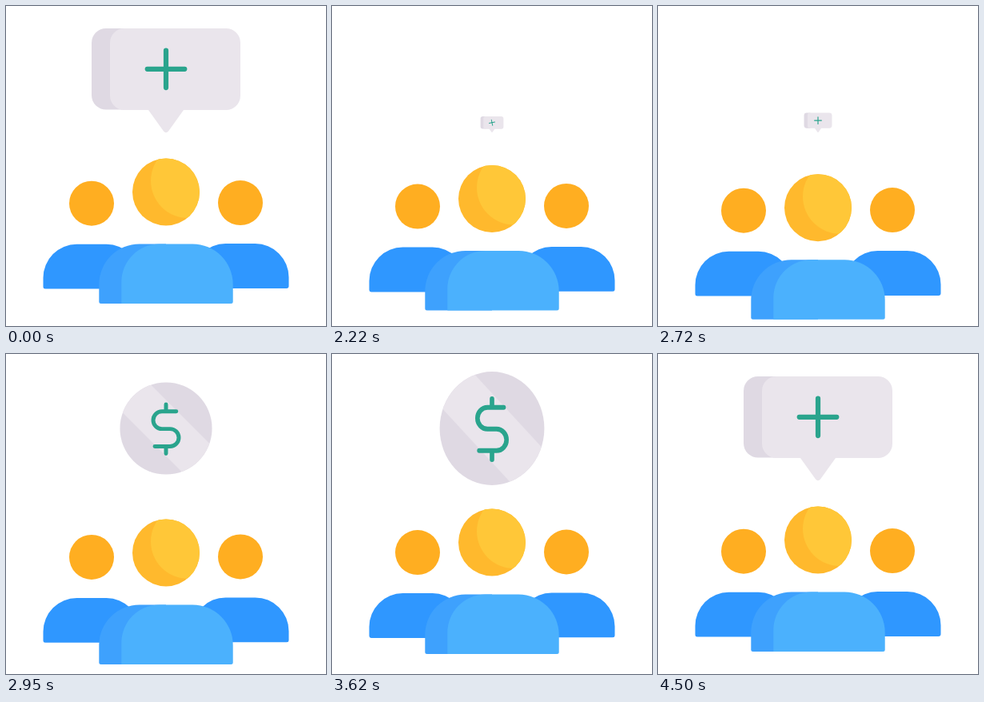
These frames come from a looping animation (400 by 400 pixels, 4.52 s). An HTML page:

```html
<!DOCTYPE html>
<html lang="en">
<head>
<meta charset="utf-8">
<title>Team message</title>
<style>
  html, body { margin: 0; width: 100%; height: 100%; overflow: hidden; background: #fff; }
  svg { display: block; width: 100vw; height: 100vh; }
  .ink { fill: none; stroke: #2aa48d; stroke-width: 6.2; stroke-linecap: round; }
  .dark { fill: #dfd9e3; }
  .light { fill: #eae5ec; }
</style>
</head>
<body>
<svg viewBox="0 0 400 400">
  <defs>
    <clipPath id="disc"><circle r="72"/></clipPath>
    <clipPath id="face"><circle cx="200" cy="232.5" r="42"/></clipPath>
    <g id="member">
      <circle cy="246.5" r="28" fill="#ffae21"/>
      <path fill="#2f97ff" d="M-60.5 351V339.500a42 42 0 0 1 42-42H18.500a42 42 0 0 1 42 42V351q0 2.300-2.500 2.300H-58q-2.500 0-2.500-2.300z"/>
    </g>
  </defs>

  <g id="sides">
    <use href="#member" x="107" y="0.2"/>
    <use href="#member" x="293" y="-0.4"/>
  </g>

  <g id="leader">
    <circle cx="200" cy="232.5" r="42" fill="#ffb92d"/>
    <circle cx="227.5" cy="218.500" r="46.500" fill="#ffc738" clip-path="url(#face)"/>
    <path fill="#3ea1fd" d="M116.300 369.500V348a50.500 50.500 0 0 1 50.500-50.500H200V372H118.800q-2.500 0-2.500-2.500z"/>
    <path fill="#4bb1fd" d="M144.300 372V345a47.500 47.500 0 0 1 47.500-47.500H233.200a50.500 50.500 0 0 1 50.500 50.500V369.500q0 2.500-2.500 2.500z"/>
  </g>

  <g id="bubble">
    <path class="dark" d="M150 28H125a18 18 0 0 0-18 18V111.500a18 18 0 0 0 18 18H150z"/>
    <path class="light" d="M148 28H275a18 18 0 0 1 18 18V112a18 18 0 0 1-18 18H222l-19 26.500q-3 3.500-6 0L178 130H148a18 18 0 0 1-18-18V46a18 18 0 0 1 18-18z"/>
    <path id="plus" class="ink" d="M176.700 78.800H223.300M200 55.500V102.100"/>
  </g>

  <g id="coin">
    <circle class="dark" r="72"/>
    <g clip-path="url(#disc)">
      <rect class="light" x="-80" y="-31.500" width="160" height="62" transform="rotate(45)"/>
    </g>
    <path class="ink" d="M16-26.600H-6.300a13.700 13.700 0 0 0 0 27.400H6.300a13.700 13.700 0 0 1 0 27.400H-17.500M0-37.500V-27M0 28.500V39.500"/>
  </g>
</svg>
<script>
const LOOP = 4520;
const el = id => document.getElementById(id);
const smooth = u => u * u * (3 - 2 * u);

// Cubic curve with flat ends whose handles sit at x = a and x = b.
function bezier(a, b) {
  return u => {
    let lo = 0, hi = 1;
    for (let i = 0; i < 20; i++) {
      const s = (lo + hi) / 2, r = 1 - s;
      if (3 * a * s * r * r + 3 * b * s * s * r + s ** 3 < u) lo = s; else hi = s;
    }
    return smooth(lo);
  };
}

// Keys are [time, value, easing towards this key].
function track(...keys) {
  return t => {
    const i = keys.findIndex(key => key[0] > t);
    if (i === 0) return keys[0][1];
    if (i < 0) return keys[keys.length - 1][1];
    const [t0, v0] = keys[i - 1], [t1, v1, ease = smooth] = keys[i];
    return v0 + (v1 - v0) * ease((t - t0) / (t1 - t0));
  };
}

const duck = track([2000, 0], [2500, 1], [4500, 0, bezier(.36, .19)]);
const spin = track([1998, 0], [2465, 360]);
const bubbleSize = track([1998, 1], [2231, .15], [2470, 1.07], [2560, 1.06], [2780, 0]);
const bubbleOpen = track([3930, 0], [4220, 1]);
const coinSize = track([2780, 0], [3020, 1]);
const coinWidth = track([3550, 1], [3930, 0]);
const coinHeight = track([3550, 1], [3930, .84]);

function place(id, x, y, sx, sy) {
  el(id).setAttribute("visibility", sx > .001 && sy > .001 ? "visible" : "hidden");
  el(id).setAttribute("transform", `translate(${x} ${y}) scale(${sx} ${sy})`);
}

function draw(t) {
  const down = duck(t);
  el("leader").setAttribute("transform", `translate(0 ${20.5 * down})`);
  el("sides").setAttribute("transform", `translate(0 ${9.4 * down})`);

  const returning = t >= 3930;
  const sx = returning ? bubbleOpen(t) : bubbleSize(t);
  const sy = returning ? 1 : sx;
  place("bubble", 200 * (1 - sx), 158 * (1 - sy), sx, sy);
  el("plus").setAttribute("transform", `rotate(${spin(t)} 200 78.8)`);

  const size = coinSize(t);
  place("coin", 200, 93, size * coinWidth(t), size * coinHeight(t));
}

const start = performance.now();
function tick() {
  draw((performance.now() - start) % LOOP);
  requestAnimationFrame(tick);
}
tick();
</script>
</body>
</html>
```
